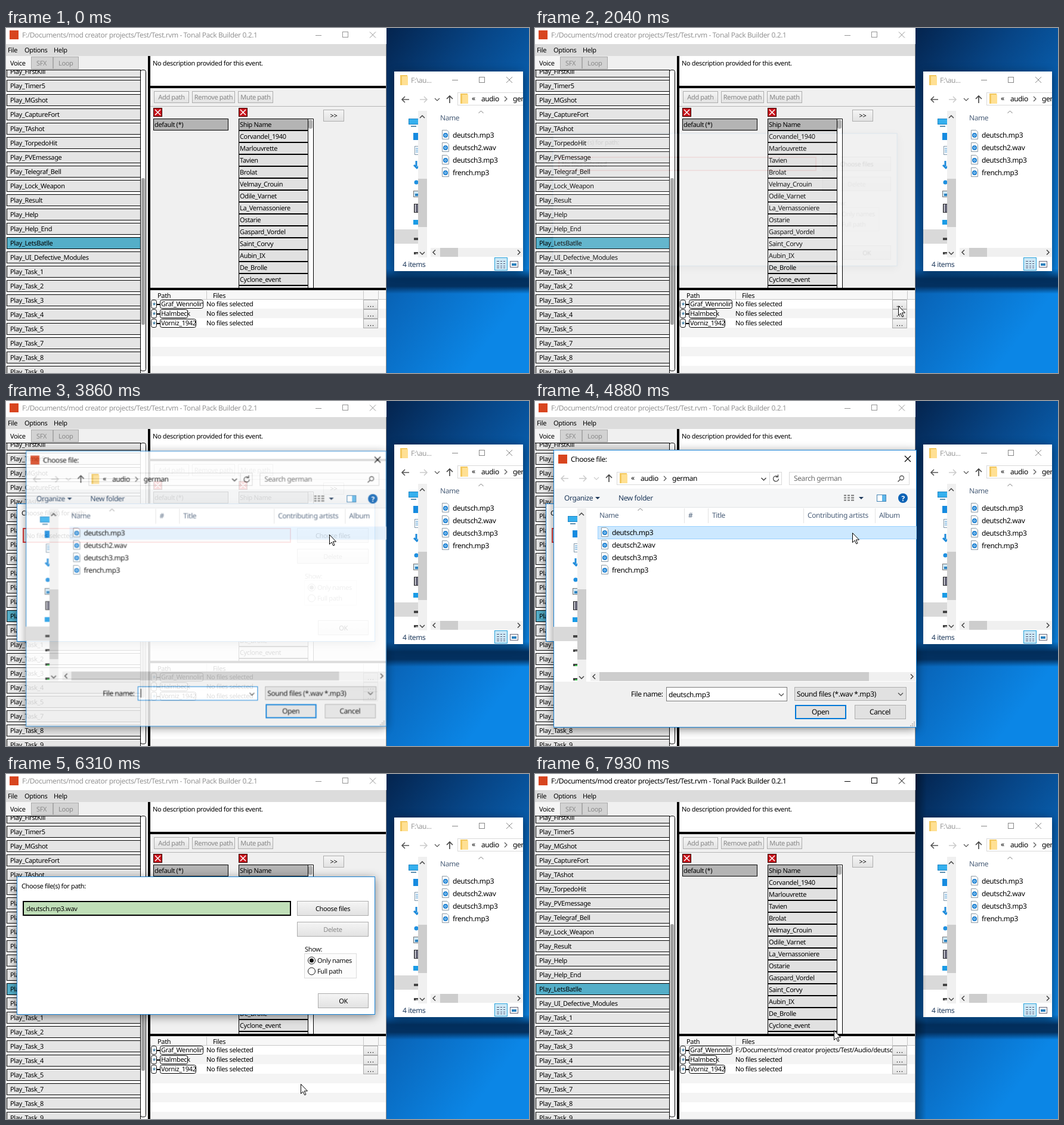
An HTML page that plays this animation: 877x579 px, repeating every 8000 ms.

```html
<!DOCTYPE html>
<html lang="en">
<head>
<meta charset="utf-8">
<title>Choosing an audio file</title>
<style>
html, body { margin: 0; width: 100%; height: 100%; overflow: hidden; background: #fff; }
svg { display: block; }
#stage { width: 877px; height: 579px; }
rect { shape-rendering: crispEdges; }
rect[rx] { shape-rendering: auto; }
text {
  font: 11px "Noto Sans", "Open Sans", sans-serif;
  letter-spacing: -.35px; text-rendering: geometricPrecision; white-space: pre;
}
text.shell { font-size: 12px; letter-spacing: -.4px; }
.shadow { filter: drop-shadow(0 3px 8px #0007); }
</style>
</head>
<body>
<svg id="stage" viewBox="0 0 877 579">
  <defs>
    <linearGradient id="sky" x1="0" y1="0" x2=".55" y2="1">
      <stop offset="0" stop-color="#04244e"/><stop offset=".3" stop-color="#074586"/>
      <stop offset=".65" stop-color="#0968bd"/><stop offset="1" stop-color="#0b86e6"/>
    </linearGradient>
    <linearGradient id="dusk" x1="0" y1="0" x2="0" y2="1">
      <stop offset="0" stop-color="#03305f" stop-opacity="0"/><stop offset=".4" stop-color="#03305f"/>
      <stop offset=".7" stop-color="#03305f"/><stop offset="1" stop-color="#03305f" stop-opacity="0"/>
    </linearGradient>
    <linearGradient id="face" x1="0" y1="0" x2="0" y2="1">
      <stop offset="0" stop-color="#f5f5f5"/><stop offset="1" stop-color="#e2e2e2"/>
    </linearGradient>
    <linearGradient id="edge">
      <stop offset="0" stop-color="#000" stop-opacity=".35"/><stop offset="1" stop-color="#000" stop-opacity="0"/>
    </linearGradient>
  </defs>
</svg>
<script>
const LOOP = 8000;
let layer = document.getElementById('stage');

function el(name, attrs) {
  const node = document.createElementNS('http://www.w3.org/2000/svg', name);
  for (const key in attrs) node.setAttribute(key, attrs[key]);
  return layer.appendChild(node);
}
function inside(node, draw) {
  const outer = layer;
  layer = node;
  draw();
  layer = outer;
  return node;
}
const group = (draw, attrs) => inside(el('g', attrs), draw);
const pane = (x, y, width, height, draw) =>
  inside(el('svg', { x, y, width, height, viewBox: [x, y, width, height].join(' ') }), draw);
const fill = (x, y, width, height, color, more) => el('rect', { x, y, width, height, fill: color, ...more });
const box = (x, y, w, h, color, edge, more) =>
  el('rect', { x: x + .5, y: y + .5, width: w - 1, height: h - 1, fill: color, stroke: edge, ...more });
const line = (d, color, width = 1) => el('path', { d, fill: 'none', stroke: color, 'stroke-width': width });
const disc = (cx, cy, r, color, more) => el('circle', { cx, cy, r, fill: color, ...more });
function text(x, y, string, color = '#000', more) {
  const node = el('text', { x, y, fill: color, ...more });
  node.textContent = string;
  return node;
}
const shell = (x, y, string, color = '#000') => text(x, y, string, color, { class: 'shell' });
function button(x, y, w, h, label, color = '#000') {
  box(x, y, w, h, 'url(#face)', '#adadad');
  text(x + w / 2, y + h / 2 + 4, label, color, { 'text-anchor': 'middle' });
}
const turns = { up: 'm-4 2l4-4l4 4', down: 'm-4-2l4 4l4-4', left: 'm2-4l-4 4l4 4', right: 'm-2-4l4 4l-4 4' };
const chevron = (x, y, way, color = '#444', width = 1.5) => line(`M${x} ${y}${turns[way]}`, color, width);
const cross = (x, y, r, color, width = 1) =>
  line(`M${x - r} ${y - r}l${2 * r} ${2 * r}m0 ${-2 * r}l${-2 * r} ${2 * r}`, color, width);

// Holds every table value until the next listed time.
function play(node, table) {
  const frames = table.map(([ms, style]) => ({ offset: ms / LOOP, easing: 'step-end', ...style }));
  frames.push({ ...frames[frames.length - 1], offset: 1 });
  node.animate(frames, { duration: LOOP, iterations: Infinity });
}
const between = (node, from, to = LOOP) => play(node, [
  [0, { opacity: from ? 0 : 1 }],
  ...(from ? [[from, { opacity: 1 }]] : []),
  ...(to < LOOP ? [[to, { opacity: 0 }]] : [])
]);
const popup = (node, origin, table) => {
  node.style.transformOrigin = origin;
  play(node, table.map(([ms, opacity, scale]) => [ms, { opacity, transform: `scale(${scale})` }]));
};

function folder(x, y) {
  fill(x, y, 12, 17, '#f3c85f');
  fill(x + 3, y + 2, 10, 15, '#ffe093');
}
function addressBar(x, y, back) {
  const arrow = (ax, d, color) => line(`M${x + ax} ${y}${d}`, color, 1.6);
  arrow(13, 'h-12m5-5l-5 5l5 5', back);
  arrow(31, 'h12m-5-5l5 5l-5 5', '#ccc');
  chevron(x + 60, y, 'down', back, 1.2);
  arrow(81, 'm0 6v-12m-5 5l5-5l5 5', '#444');
}
function crumbs(x, y, last) {
  folder(x, y - 9);
  shell(x + 19, y + 3, '«');
  shell(x + 35, y + 4, 'audio');
  chevron(x + 76, y, 'right', '#555', 1.2);
  shell(x + 88, y + 4, last);
}

// File list with its narrow navigation strip, shared by both file windows.
function fileBrowser(drives, bottom, thumbHeight, thumbTop) {
  pane(651, 139, 40, bottom - 139, () => {
    fill(651, 338, 40, 24, '#d9d9d9');
    box(675, 152, 17, 10, '#35b0ee', '#1b83c4');
    fill(679, 164, 9, 2, '#5d8fb0');
    fill(683, 176, 9, 12, '#168be0');
    box(685, 198, 9, 15, '#fff', '#8298aa');
    line('M687 202h5m-5 3h5m-5 3h5', '#3b8fce');
    line('M688 223v9m-4-2l5 5l5-5', '#1e8bdb', 3);
    disc(688, 259, 3.5, '#1e90e0');
    box(683, 273, 12, 11, '#cfe8f7', '#777');
    fill(686, 278, 8, 4, '#2d82be');
    box(684, 295, 10, 15, '#667', '#333');
    line('M686.5 296v13', '#fff', 1);
    fill(683, 322, 8, 8, '#199be6');
    for (let i = 0; i < drives; i++) {
      fill(684, 352 + i * 24, 8, 4, '#444');
      if (i) fill(687, 354 + i * 24, 5, 2, i > 1 ? '#35c748' : '#999');
    }
  });
  fill(691, 139, 15, bottom - 139, '#f0f0f0');
  fill(691, thumbTop, 15, thumbHeight, '#cdcdcd');
  chevron(698, 149, 'up');
  chevron(698, bottom - 7, 'down');
  shell(728, 155, 'Name', '#4c607a');
  chevron(796.5, 141, 'up', '#777', 1);
  ['deutsch.mp3', 'deutsch2.wav', 'deutsch3.mp3', 'french.mp3'].forEach((name, i) => {
    const y = 171 + i * 21;
    el('path', { d: `M731.5 ${y + .5}h8l3 3v12h-11z`, fill: '#fff', stroke: '#8c9aa5' });
    disc(737, y + 9, 4, '#1c7fd0');
    disc(737, y + 9, 2, '#b9e1fa');
    disc(737, y + 9, 1, '#1c7fd0');
    shell(749, y + 13, name);
  });
}
function sideScroll(x, y, w, thumbX, thumbW) {
  fill(x, y, w, 15, '#f0f0f0');
  fill(thumbX, y, thumbW, 15, '#cdcdcd');
  chevron(x + 6, y + 7.5, 'left');
  chevron(x + w - 6, y + 7.5, 'right');
}

function drawDesktop() {
  fill(638, 0, 239, 579, 'url(#sky)');
  fill(638, 404, 239, 42, 'url(#dusk)');
}

function drawExplorer() {
  fill(651, 73, 216, 335, '#fff', { class: 'shadow' });
  pane(651, 73, 216, 335, () => {
    folder(661, 79);
    shell(679, 92, 'F:\\au...', '#999');
    line('M748 87.5h10', '#888');
    box(793, 82, 10, 10, 'none', '#888');
    cross(844, 87, 5, '#888');
    addressBar(663, 120, '#555');
    box(757, 108, 120, 22, '#fff', '#d9d9d9');
    crumbs(762, 119, 'german');
    fileBrowser(2, 385, 81, 253);
    sideScroll(712, 369, 154, 728, 30);
    shell(665, 401, '4 items', '#1e395b');
    box(819, 385, 22, 22, '#cce8f6', '#26a0da');
    line('M823 391.5h4m2 0h3m2 0h3m-14 4h4m2 0h3m2 0h3m-14 4h4m2 0h3m2 0h3m-14 3h4m2 0h3m2 0h3', '#557');
    box(845, 391, 14, 11, '#fff', '#667');
    fill(848, 395, 8, 4, '#2d82be');
  });
}

function drawEventList() {
  fill(0, 47, 238, 532, '#f0f0f0');
  fill(0, 47, 42, 23, '#f5f5f5');
  box(42, 48, 37, 21, '#d2d2d2', '#aaa');
  box(79, 48, 43, 21, '#d2d2d2', '#aaa');
  text(7, 63, 'Voice');
  text(51, 63, 'SFX', '#8a8a8a');
  text(88, 63, 'Loop', '#8a8a8a');
  fill(0, 70, 236, 509, '#fff');
  pane(0, 70, 238, 509, () => {
    const events = ('FirstKill Timer5 MGshot CaptureFort TAshot TorpedoHit PVEmessage Telegraf_Bell Lock_Weapon ' +
      'Result Help Help_End LetsBatlle UI_Defective_Modules Task_1 Task_2 Task_3 Task_4 Task_5 Task_7 Task_8 Task_9').split(' ');
    events.forEach((name, i) => {
      const y = 63 + i * 24;
      box(1, y, 225, 20, name === 'LetsBatlle' ? '#54aec8' : '#e5e5e5', '#000');
      text(7, y + 14, 'Play_' + name);
    });
  });
  fill(0, 70, 226, 1, '#000');
  box(225, 70, 10, 506, '#fff', '#000', { rx: 3 });
  fill(227, 252, 6, 246, '#a0a0a0', { rx: 2 });
}

function drawShips() {
  fill(242, 101, 396, 335, '#f0f0f0');
  fill(242, 131, 396, 1, '#b4b4b4');
  button(248, 106, 59, 20, 'Add path', '#858585');
  button(312, 106, 72, 20, 'Remove path', '#858585');
  button(389, 106, 59, 20, 'Mute path', '#858585');
  for (const x of [247, 390]) {
    box(x, 134, 15, 15, '#c8141c', '#300');
    cross(x + 7.5, 141.5, 4.5, '#fff', 1.5);
  }
  box(247, 152, 126, 20, '#b4b4b4', '#000');
  text(249, 166, 'default (*)');
  button(532, 137, 35, 20, '>>');
  pane(390, 152, 127, 284, () => {
    const ships = ('Ship Name,Corvandel_1940,Marlouvrette,Tavien,Brolat,Velmay_Crouin,Odile_Varnet,La_Vernassoniere,' +
      'Ostarie,Gaspard_Vordel,Saint_Corvy,Aubin_IX,De_Brolle,Cyclone_event,').split(',');
    fill(507, 152, 9, 284, '#fff');
    ships.forEach((name, i) => {
      const y = 152 + i * 20;
      box(390, y, 117, 20, i ? '#e1e1e1' : '#b4b4b4', '#000');
      text(392, y + 14, name);
    });
    line('M507 152.5h8.5v290', '#000');
    fill(507, 154, 7, 15, '#b0b0b0', { rx: 3 });
  });
}

function drawPaths() {
  fill(242, 440, 396, 139, '#fff');
  fill(242, 440, 396, 15, '#f7f7f7');
  for (let y = 471; y < 579; y += 32) fill(242, y, 396, 16, '#f4f4f4');
  fill(242, 455, 396, 1, '#c8c8c8');
  for (const x of [336, 599, 624]) fill(x, 441, 1, 14, '#c8c8c8');
  text(254, 453, 'Path');
  text(347, 453, 'Files');
  [['Graf_Wennolin', 73], ['Halmbeck', 47], ['Vorniz_1942', 61]].forEach(([name, width], i) => {
    const y = 456 + i * 16;
    fill(252, y + 7, 6, 2, '#000');
    box(243, y, 10, 15, '#fff', '#000', { rx: 3 });
    text(245.5, y + 13, '*', '#075a8c');
    box(258, y, width, 15, '#fff', '#000', { rx: 3 });
    text(260, y + 11, name);
    const empty = text(336, y + 11, 'No files selected');
    if (!i) {
      between(empty, 0, 7730);
      pane(336, y, 263, 16, () => between(
        text(336, y + 11, 'F:/Documents/mod creator projects/Test/Audio/deutsch.mp3.wav'), 7730));
    }
    box(599, y, 25, 16, 'url(#face)', '#adadad');
    text(606, y + 12, '...', '#000', { style: 'letter-spacing:1px' });
  });
}

function drawApp() {
  between(fill(638, 0, 18, 579, 'url(#edge)'), 7730);
  fill(0, 0, 638, 579, '#fff');
  fill(6, 4, 15, 15, '#d8451f');
  play(group(() => {
    shell(27, 16, 'F:/Documents/mod creator projects/Test/Test.rvm - Tonal Pack Builder 0.2.1', 'currentColor');
    line('M519 12.5h10', 'currentColor');
    box(564, 6, 10, 10, 'none', 'currentColor');
    cross(615, 11.5, 5, 'currentColor');
  }), [[0, { color: '#959595' }], [7730, { color: '#000' }]]);
  fill(0, 27, 638, 20, '#dcdcdc');
  text(3, 41, 'File');
  text(31, 41, 'Options');
  text(80, 41, 'Help');
  drawEventList();
  text(246, 63, 'No description provided for this event.');
  drawShips();
  drawPaths();
  fill(238, 47, 4, 532, '#000');
  fill(242, 97, 396, 4, '#000');
  fill(242, 436, 396, 4, '#000');
  fill(637, 27, 1, 552, '#8a8a8a');
}

function drawDialog() {
  box(18, 172, 601, 232, '#fff', '#1883d7', { class: 'shadow' });
  text(26, 192, 'Choose file(s) for path:');
  const field = el('rect', { x: 29, y: 214, width: 448, height: 23, 'stroke-width': 2 });
  play(field, [[0, { fill: '#e5e5e5', stroke: '#dc3c3c' }], [6310, { fill: '#c0dfb8', stroke: '#000' }]]);
  between(text(34, 230, 'No files selected'), 0, 6310);
  between(text(34, 230, 'deutsch.mp3.wav'), 6310);
  button(488, 213, 120, 25, 'Choose files');
  button(488, 248, 120, 25, 'Delete', '#8a8a8a');
  button(523, 368, 85, 25, 'OK');
  box(500, 301, 88, 42, '#fcfcfc', '#dcdcdc');
  play(group(() => {
    text(501, 298, 'Show:', 'currentColor');
    text(522, 317, 'Only names', 'currentColor');
    text(522, 335, 'Full path', 'currentColor');
    for (const y of [313, 331]) disc(512.5, y, 6, '#fff', { stroke: 'currentColor' });
    disc(512.5, 313, 3.5, 'currentColor');
  }), [[0, { color: '#858585' }], [6310, { color: '#111' }]]);
}

function drawChooser() {
  box(31, 82, 609, 466, '#fff', '#1883d7', { class: 'shadow' });
  fill(39, 90, 15, 15, '#d8451f');
  shell(60, 102, 'Choose file:');
  cross(625, 97, 5, '#000', 1.2);
  addressBar(43, 130, '#ccc');
  box(137, 119, 277, 22, '#fff', '#d9d9d9');
  crumbs(142, 130, 'german');
  chevron(383.5, 131, 'down');
  fill(393, 120, 1, 20, '#d9d9d9');
  line('M407 127a4.5 4.5 0 1 0 1.5 3.5M407.5 123.500v4h-4', '#555', 1.4);
  box(426, 119, 202, 22, '#fff', '#d9d9d9');
  shell(434, 134, 'Search german', '#6d6d6d');
  disc(615, 129, 3.5, 'none', { stroke: '#555', 'stroke-width': 1.3 });
  line('M612.5 131.500l-4 4', '#555', 1.6);

  fill(32, 147, 607, 31, '#f5f6f7');
  fill(32, 178, 607, 1, '#e2e4e6');
  shell(49, 167, 'Organize', '#1e395b');
  shell(140, 167, 'New folder', '#1e395b');
  for (const x of [105, 547]) el('path', { d: `M${x - 4} 161h8l-4 4z`, fill: '#1e395b' });
  line('M518 158.500h4m2 0h4m2 0h5m-17 4h4m2 0h4m2 0h5m-17 4h4m2 0h4m2 0h5', '#777', 2);
  box(573, 157, 16, 12, '#fff', '#4685b5');
  fill(582, 158, 6, 10, '#5fb7ea');
  disc(617, 163, 8, '#0b62b5');
  text(614.5, 167.5, '?', '#fff', { style: 'font-weight:bold;font-size:12px' });

  for (const x of [250, 290, 450, 570]) fill(x, 180, 1, 25, '#e3e3e3');
  [[257, '#'], [297, 'Title'], [457, 'Contributing artists'], [577, 'Album']]
    .forEach(([x, label]) => shell(x, 196, label, '#4c607a'));
  const row = box(105, 210, 535, 22, '#e5f3ff', '#e5f3ff');
  play(row, [[0, { fill: '#e5f3ff', stroke: '#e5f3ff' }], [4880, { fill: '#cce8ff', stroke: '#99d1ff' }]]);
  group(() => fileBrowser(5, 430, 118, 275), { transform: 'translate(-620 41)' });
  sideScroll(93, 455, 545, 108, 452);

  fill(32, 471, 607, 76, '#f0f0f0');
  shell(161, 496, 'File name:');
  const name = box(220, 480, 203, 24, '#fff', '#0078d7');
  play(name, [[0, { stroke: '#0078d7' }], [4880, { stroke: '#7a7a7a' }]]);
  between(fill(225, 484, 1, 15, '#000'), 0, 4880);
  between(shell(224, 497, 'deutsch.mp3'), 4880);
  chevron(413, 493, 'down', '#444', 1.2);
  box(435, 480, 188, 23, '#e1e1e1', '#adadad');
  shell(439, 496, 'Sound files (*.wav *.mp3)');
  chevron(613, 492, 'down', '#444', 1.2);
  el('rect', { x: 437, y: 511, width: 84, height: 22, fill: '#e1e1e1', stroke: '#0078d7', 'stroke-width': 2 });
  box(536, 510, 86, 24, '#e1e1e1', '#adadad');
  shell(464, 526, 'Open');
  shell(561, 526, 'Cancel');
  for (let i = 0; i < 3; i++)
    for (let j = 0; j <= i; j++) fill(635 - j * 3, 538 + i * 3, 2, 2, '#bcbcbc');
}

group(drawDesktop);
group(drawExplorer);
group(drawApp);
popup(group(drawDialog), '318px 288px', [
  [0, 0, .96], [2040, .1, .962], [2240, .95, .996], [2440, 1, 1], [7730, .1, .962], [7930, 0, .96]
]);
popup(group(drawChooser), '335px 315px', [
  [0, 0, .97], [3860, .87, .993], [4080, 1, 1], [6100, .35, .97], [6310, 0, .97]
]);

const cursor = el('path', {
  d: 'M.5.5V16.500L4 13L6.800 18.800L9 17.800L6.300 12H11.500Z', fill: '#fff', stroke: '#000'
});
const route = [
  [200, 697, 553], [400, 682, 541], [600, 648, 507], [810, 619, 476], [1020, 605, 467], [1220, 609, 465], [1420, 609, 466],
  [2440, 606, 450], [2640, 585, 388], [2840, 568, 343], [3060, 562, 300],
  [3260, 552, 252], [3460, 544, 229], [3660, 542, 224], [4280, 532, 221],
  [5080, 523, 280], [5290, 500, 420], [5500, 490, 483], [5700, 493, 514], [5900, 494, 520],
  [6710, 499, 503], [6910, 524, 440], [7120, 553, 393], [7320, 562, 381], [7730, 545, 388], [7930, 501, 430]
];
play(cursor, [
  [0, { opacity: 0, transform: 'translate(697px, 553px)' }],
  ...route.map(([ms, x, y]) => [ms, { opacity: 1, transform: `translate(${x}px, ${y}px)` }])
]);
</script>
</body>
</html>
```
